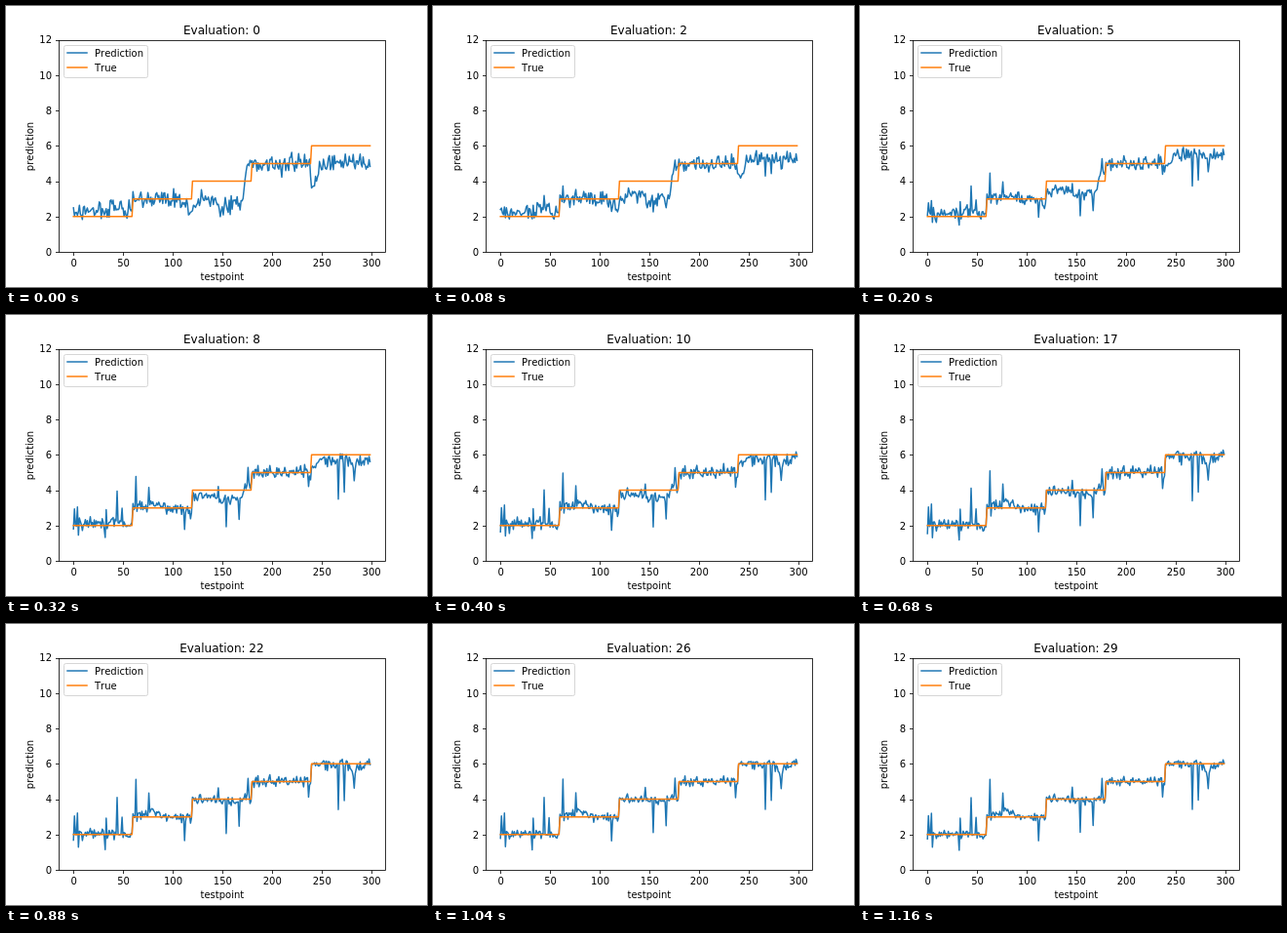
An HTML page that plays this animation: 432 by 288 pixels, repeating every 1200 ms.

```html
<!DOCTYPE html>
<html lang="en">
<head>
<meta charset="utf-8">
<title>Evaluation plot</title>
<style>
html, body { margin: 0; width: 100%; height: 100%; overflow: hidden; background: #fff; }
svg { display: block; width: 432px; height: 288px; }
text { font: 10px "DejaVu Sans", sans-serif; font-kerning: none; fill: #000; }
.title { font-size: 12px; }
.mid { text-anchor: middle; }
.end { text-anchor: end; }
.axis { fill: none; stroke: #000; stroke-width: .8; }
.line { fill: none; stroke-width: 1.5; stroke-linejoin: round; stroke-linecap: square; }
.pred { stroke: #1f77b4; }
.true { stroke: #ff7f0e; }
</style>
</head>
<body>
<svg viewBox="0 0 432 288">
  <rect width="432" height="288" fill="#fff"/>
  <g id="ticks"></g>
  <path id="pred" class="line pred"/>
  <path id="true" class="line true"/>
  <rect class="axis" x="54.5" y="35.5" width="335" height="217"/>
  <text id="title" class="title mid" x="221.4" y="29"></text>
  <text class="mid" x="221.9" y="281">testpoint</text>
  <text class="mid" transform="translate(28 144) rotate(-90)">prediction</text>
  <rect x="59.5" y="40.5" width="86" height="33" rx="2" fill="#fff" fill-opacity=".8" stroke="#ccc" stroke-width=".8"/>
  <path class="line pred" d="M63 48H83"/>
  <path class="line true" d="M63 63H83"/>
  <text x="91" y="52">Prediction</text>
  <text x="91" y="67">True</text>
</svg>
<script>
const COUNT = 300, EVALS = 30, STEP_MS = 40;

// key points of the untrained curve: testpoint, value
const EARLY = [
  [0, 2.2], [59, 2.5], [60, 3], [112, 2.9], [119, 2.3], [127, 3.1], [152, 2.5],
  [170, 2.8], [174, 4.9], [238, 5], [240, 3.7], [250, 5], [299, 5]
];

// outliers that grow while training: testpoint -> offset
const SPIKES = {
  1: 1.1, 4: 1.2, 5: -.7, 32: -.95, 33: .95, 44: 2.1, 49: 1, 63: 2.1, 76: .9,
  112: -1.4, 146: .7, 154: -1.8, 167: -1.5, 176: 1.2, 237: -.9, 267: -2.6, 273: -2, 283: -.9
};

const $ = id => document.getElementById(id);
const mix = (a, b, u) => a + (b - a) * u;
const px = i => 69.22 + i * 1.01794;
const py = v => 252 - v * 18.12;
const snap = n => Math.floor(n + .5) + .5;
const approach = (e, rate) => 1 - Math.exp(-e / rate);
const bump = (i, at, width) => Math.exp(-(((i - at) / width) ** 2));
const truth = i => 2 + Math.floor(i / 60);
const settled = i => truth(i) + .4 * bump(i, 78, 8) - .5 * bump(i, 282, 5);

function rand(a, b) {
  let h = Math.imul(a + 1, 0x9E3779B1) ^ Math.imul(b + 7, 0x85EBCA6B);
  h = Math.imul(h ^ h >>> 15, 0x2C1B3C6D);
  h = Math.imul(h ^ h >>> 12, 0x297A2D39);
  return ((h ^ h >>> 15) >>> 0) / 4294967296;
}
const noise = (i, k) => rand(i, k) + rand(i, k + 500) - 1;

function early(i) {
  const k = Math.max(1, EARLY.findIndex(p => p[0] >= i));
  const [x0, v0] = EARLY[k - 1], [x1, v1] = EARLY[k];
  return mix(v0, v1, (i - x0) / (x1 - x0));
}

function predict(i, e) {
  const base = mix(early(i), settled(i), approach(e, 7));
  const spike = (SPIKES[i] || 0) * approach(e, 4);
  const amp = mix(.62, .28, e / (EVALS - 1));
  const wobble = mix(noise(i, 1), noise(i, 2), Math.min(1, e / 12));
  const calm = i in SPIKES ? .3 : 1;
  return base + spike + (wobble + noise(i, 20 + e) * .3) * amp * calm;
}

function curve(fn) {
  let d = "";
  for (let i = 0; i < COUNT; i++) {
    d += (i ? "L" : "M") + px(i).toFixed(2) + " " + py(fn(i)).toFixed(2);
  }
  return d;
}

let ticks = "";
for (let v = 0; v <= 12; v += 2) {
  const y = py(v);
  ticks += `<path class="axis" d="M54.5 ${snap(y)}h-3.5"/>
    <text class="end" x="47" y="${Math.round(y + 3.9)}">${v}</text>`;
}
for (let v = 0; v <= 300; v += 50) {
  const x = px(v);
  ticks += `<path class="axis" d="M${snap(x)} 252.5v3.5"/>
    <text class="mid" x="${x + .5}" y="267">${v}</text>`;
}
$("ticks").innerHTML = ticks;
$("true").setAttribute("d", curve(truth));

let shown = -1;
function draw(now) {
  const e = Math.floor(Math.max(0, now) / STEP_MS) % EVALS;
  if (e === shown) return;
  shown = e;
  $("title").textContent = "Evaluation: " + e;
  $("pred").setAttribute("d", curve(i => predict(i, e)));
}

const start = performance.now();
function tick() {
  draw(performance.now() - start);
  requestAnimationFrame(tick);
}
tick();
</script>
</body>
</html>
```
